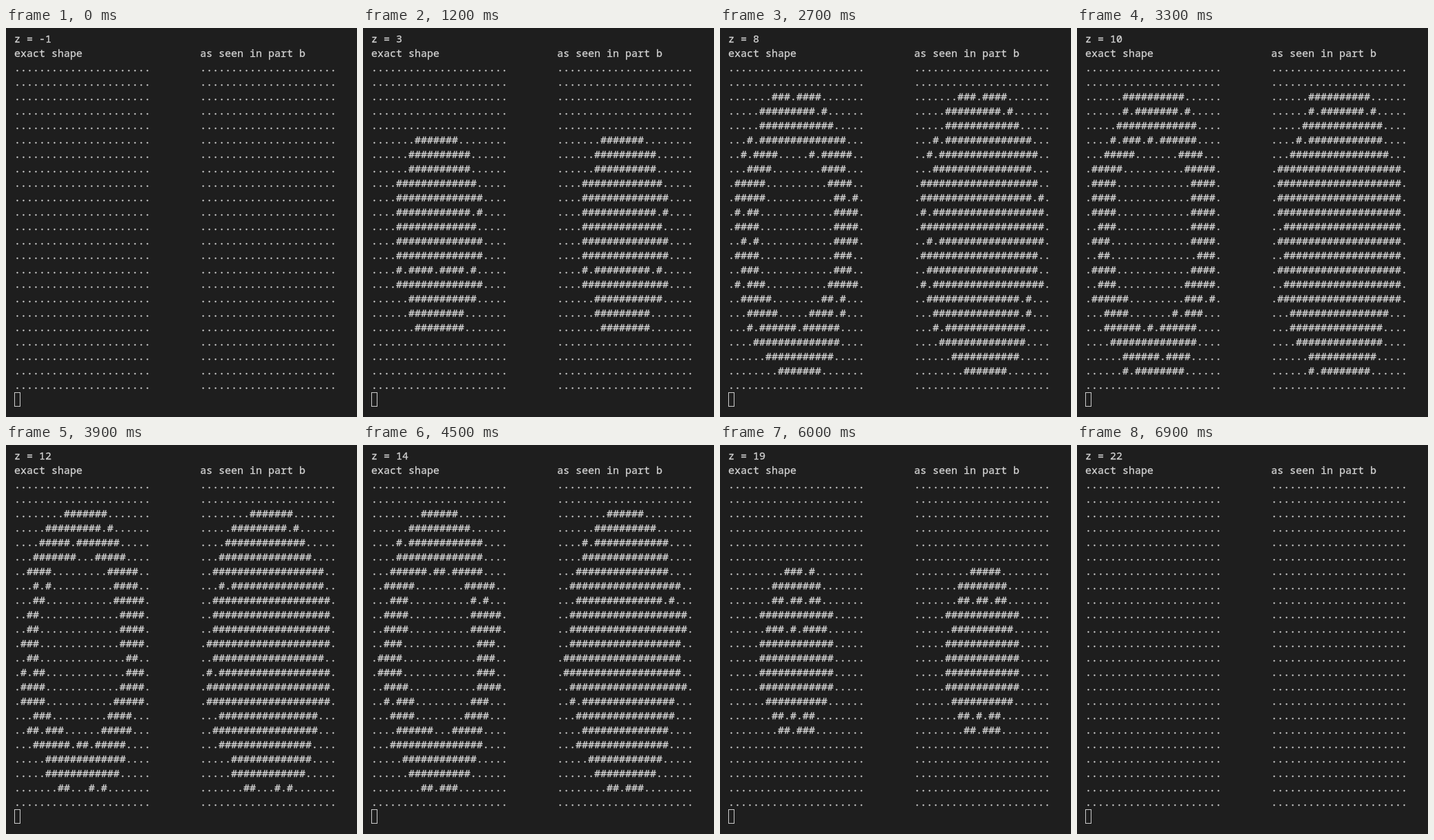
These frames come from a looping animation (510x566 px, 7.2 s). An HTML page:

```html
<!DOCTYPE html>
<html lang="en">
<head>
<meta charset="utf-8">
<title>Slices</title>
<style>
  html, body { margin: 0; width: 100%; height: 100%; overflow: hidden; background: #1e1e1e; }
  svg { display: block; width: 510px; height: 566px; }
  text {
    font: 15px "Noto Sans Mono", "Liberation Mono", monospace;
    fill: #d4d4d4; stroke: #d4d4d4; stroke-width: 0.3px; white-space: pre;
  }
  rect { fill: none; stroke: #ccc; }
</style>
</head>
<body>
<svg viewBox="0 0 510 566"><rect x="12.5" y="530.5" width="8" height="20"/></svg>
<script>
const COLS = 22, ROWS = 23, LINE = 21, BASELINE = 21;
const STEP_MS = 300, FIRST_Z = -1, STEPS = 24;
const CENTER = { col: 10.5, row: 11.5, z: 10.5 };
const OUTER_SQUARE = 112, HOLLOW_SQUARE = 45;

function noise(z, row, col) {
  const s = Math.sin(z * 12.9898 + row * 78.233 + col * 37.719) * 43758.5453;
  return s - Math.floor(s);
}

// First and last filled column where a slightly rough sphere crosses this row.
function sphereSpan(z, row) {
  const square = OUTER_SQUARE - (z - CENTER.z) ** 2 - (row - CENTER.row) ** 2;
  if (square <= 0 || row < 2 || row > 21) return null;
  const half = Math.sqrt(square);
  const inset = side => Math.floor(noise(z, row, side) * 1.6);
  const left = Math.max(1, Math.ceil(CENTER.col - half)) + inset(40);
  const right = Math.min(20, Math.floor(CENTER.col + half)) - inset(50);
  return left <= right ? [left, right] : null;
}

// Gaps are likeliest just inside the rim and in the short rows at the poles.
function isFilled(z, row, col, span) {
  if (!span || col < span[0] || col > span[1]) return false;
  const [left, right] = span;
  if (col === left || col === right) return true;
  const chance = right - left < 8 ? 0.2 : col === left + 1 ? 0.14 : col === right - 1 ? 0.06 : 0;
  return noise(z, row, col) >= chance;
}

function isHollow(z, row, col) {
  const n = noise(z, row, col + 60);
  const square = (col - CENTER.col) ** 2 + (row - CENTER.row) ** 2 + (z - CENTER.z) ** 2;
  return square + (n - 0.5) * 12 < HOLLOW_SQUARE || n < 0.015;
}

function sliceLine(z, row) {
  const span = sphereSpan(z, row);
  let exact = "", outer = "";
  for (let col = 0; col < COLS; col++) {
    const filled = isFilled(z, row, col, span);
    outer += filled ? "#" : ".";
    exact += filled && !isHollow(z, row, col) ? "#" : ".";
  }
  return exact.padEnd(30) + outer;
}

const svg = document.querySelector("svg");
const lines = Array.from({ length: ROWS + 2 }, (_, i) => {
  const text = document.createElementNS(svg.namespaceURI, "text");
  text.setAttribute("x", 12);
  text.setAttribute("y", BASELINE + LINE * i);
  return svg.appendChild(text);
});
lines[1].textContent = "exact shape".padEnd(30) + "as seen in part b";

let shown = null;
function draw() {
  const z = FIRST_Z + Math.floor(performance.now() / STEP_MS) % STEPS;
  if (z !== shown) {
    shown = z;
    lines[0].textContent = "z = " + z;
    for (let row = 0; row < ROWS; row++) lines[row + 2].textContent = sliceLine(z, row);
  }
  requestAnimationFrame(draw);
}
draw();
</script>
</body>
</html>
```
